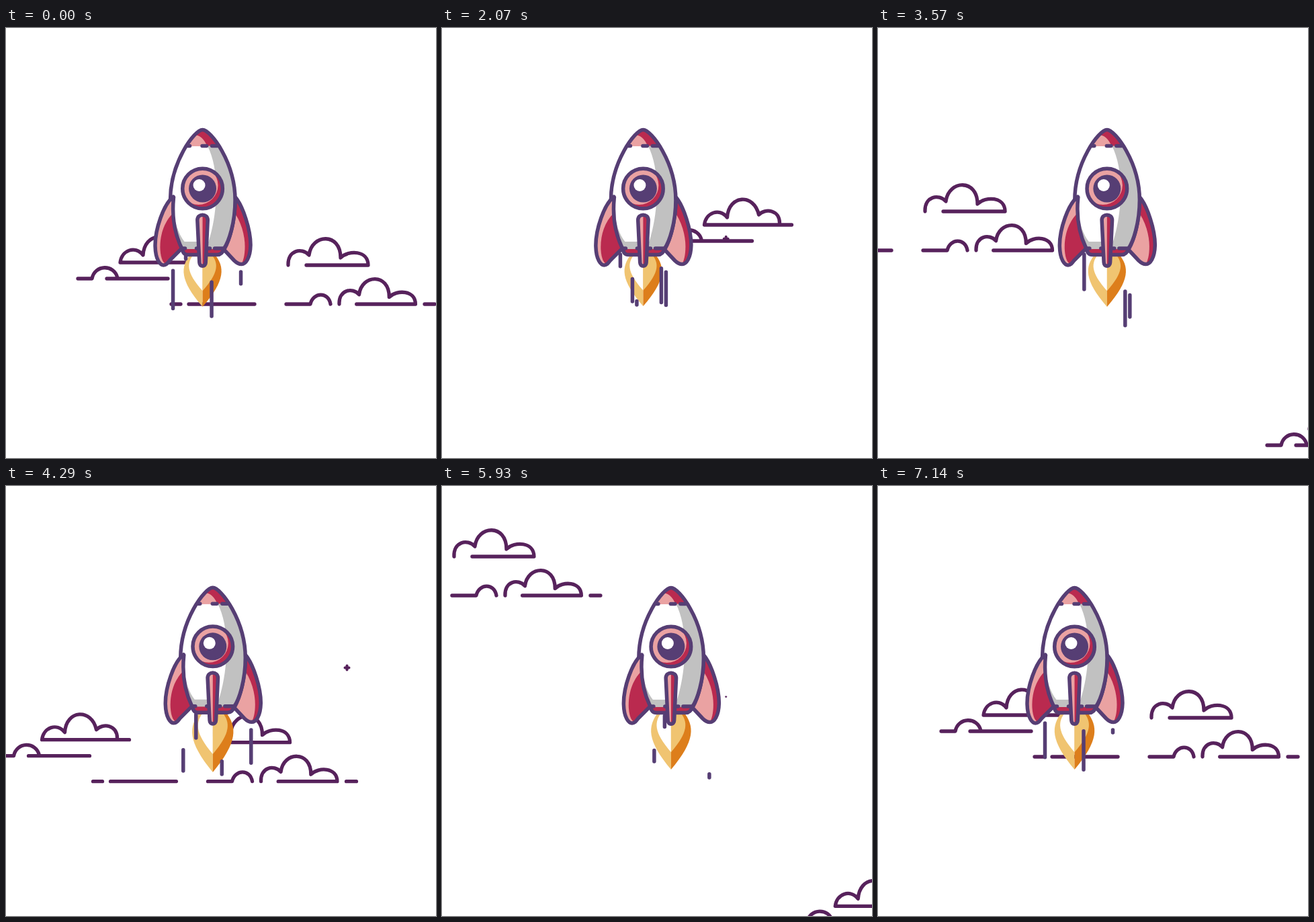
An HTML page that plays this animation: 640 px wide and 640 px high, repeating every 7.21 s.

```html
<!DOCTYPE html>
<html lang="en">
<head>
<meta charset="utf-8">
<title>Rocket</title>
<style>
  html, body { margin: 0; width: 100%; height: 100%; overflow: hidden; background: #fff; }
  svg { display: block; width: 100%; height: 100%; }
  .line { fill: none; stroke: #563e74; stroke-width: 5.5; stroke-linecap: round; stroke-linejoin: round; }
  .cloud { fill: none; stroke: #57225c; stroke-width: 5.3; stroke-linecap: round; stroke-linejoin: round; }
  .star { fill: none; stroke: #57225c; stroke-width: 4; stroke-linecap: round; }
  .pink { fill: #eaa2a2; } .red { fill: #ba2a4f; } .gray { fill: #c1c1c1; }
  .white { fill: #fff; } .dark { fill: #563e74; }
  .yellow { fill: #f0c471; } .orange { fill: #dd7e1b; }
</style>
</head>
<body>
<svg viewBox="0 0 640 640">
  <defs>
    <path id="body" d="M0 151.500C-12 151.500 -48 200 -48 256C-48 290 -38 318 -31 329H32C39 318 48.500 290 48.500 256C48.500 200 12 151.500 0 151.500Z"/>
    <path id="finL" d="M-43.500 251C-58 262 -71 300 -70.500 325C-70 345 -63 353 -58 353C-54 353 -52 350 -49 346L-31 328C-42 305 -46 280 -43 252Z"/>
    <path id="finR" d="M49 252C60 265 71.500 300 71.500 323C71 343 64 351.500 58 351.500C53 351.500 50 349 47 346L32 330C42 312 48 285 49 252Z"/>
    <path id="finC" d="M-7.700 286C-7.700 275.500 7.700 275.500 7.700 286L4.700 349C4.500 356 -4.500 356 -4.700 349Z"/>
    <clipPath id="inBody"><use href="#body"/></clipPath>
    <clipPath id="inFinL"><use href="#finL"/></clipPath>
    <clipPath id="inFinR"><use href="#finR"/></clipPath>
    <clipPath id="inFinC"><use href="#finC"/></clipPath>
    <clipPath id="inPort"><circle cy="239" r="30"/></clipPath>

    <path id="half" d="M0 0H-.62C-1.2 .25 -1.22 .5 0 1Z"/>

    <path id="puffLeft" d="M130 0H0C2 -18 22 -26 34 -11C36 -45 74 -47 81 -15C90 -25 113 -23 112 -1M-63 24H-42C-38 3 -9 2 -4 23M-20 24H71"/>
    <path id="puffRight" d="M0 0C-1 -22 20 -27 31 -15C35 -47 78 -49 78 -11C90 -23 119 -22 119 0H27"/>
    <g id="fullBank">
      <use href="#puffLeft"/>
      <path d="M76 62H90M102 62H200"/>
      <use href="#puffRight" x="250" y="4"/>
      <path d="M247 62H283C287 44 310 43 313 62M453 62H468"/>
      <use href="#puffRight" transform="translate(326 62) scale(.953)" stroke-width="5.6"/>
    </g>
    <g id="lightBank">
      <use href="#puffLeft"/>
      <use href="#puffRight" x="313" y="24"/>
    </g>
  </defs>

  <g id="sky"></g>
  <g id="ship">
    <g id="flame">
      <use href="#half" class="yellow"/>
      <use href="#half" class="orange" transform="scale(-1 1)"/>
      <use href="#half" class="white" transform="scale(.72 .7)"/>
      <use href="#half" class="yellow" transform="scale(-.72 .7)"/>
    </g>
    <g id="trails"></g>
    <g id="rocket">
      <g clip-path="url(#inFinR)">
        <use href="#finR" class="red"/>
        <path class="pink" d="M44 270C58 287 63 310 63 325C63 340 60 349 56 354L28 332Z"/>
      </g>
      <use href="#finR" class="line"/>
      <path class="red" d="M-31 328H32C30 335 27 337.500 22 337.500H-22C-27 337.500 -29 335 -31 328Z"/>
      <path class="line" d="M-31 328C-29 335 -27 337.500 -22 337.500H22C27 337.500 30 335 32 328"/>
      <g clip-path="url(#inBody)">
        <use href="#body" class="gray"/>
        <path class="white" d="M-60 175H7C25 208 24 270 9 318H-27C-35 308 -41 292 -44 270L-60 250Z"/>
        <path class="red" d="M-40 140H40V175.500H-40Z"/>
        <path class="pink" d="M-34 176C-18 156 -4 152 7 176Z"/>
      </g>
      <path class="line" d="M-31 328C-38 318 -48 290 -48 256C-48 200 -12 151.500 0 151.500C12 151.500 48.500 200 48.500 256C48.500 290 39 318 32 328"/>
      <path class="line" d="M-22 175.500H-19M-.5 175.500H6M14 175.500H22M-32 328H-26M-9 328H11M18 328H32"/>
      <g clip-path="url(#inFinL)">
        <use href="#finL" class="pink"/>
        <path class="red" d="M-40 272C-58 287 -64 310 -63 330C-62 345 -58 350 -54 352L-28 330Z"/>
      </g>
      <use href="#finL" class="line"/>
      <g clip-path="url(#inPort)">
        <circle class="red" cy="239" r="30"/>
        <circle class="pink" cx="-6" cy="234" r="29"/>
      </g>
      <circle class="line" cy="239" r="29.800"/>
      <circle class="dark" cy="239" r="20.500"/>
      <circle class="white" cx="-5" cy="234" r="9"/>
      <g clip-path="url(#inFinC)">
        <use href="#finC" class="red"/>
        <path class="pink" d="M-10 270H0V360H-10Z"/>
      </g>
      <use href="#finC" class="line"/>
    </g>
  </g>
</svg>
<script>
const LOOP = 7210, SHOTS = 101, SHOT_RATE = 14, RATE = 25, TICKS = 180;
const $ = id => document.getElementById(id);

function add(parent, tag, attrs) {
  const el = document.createElementNS("http://www.w3.org/2000/svg", tag);
  for (const key in attrs) el.setAttribute(key, attrs[key]);
  return parent.appendChild(el);
}
const move = (el, x, y, more = "") => el.setAttribute("transform", `translate(${x} ${y}) ${more}`);

// position (x, y) at tick `at`, then constant drift per tick
const banks = [
  { shape: "fullBank", at: 0, x: 170, y: 349, dx: 12.97, dy: 8, wraps: true },
  { shape: "lightBank", at: 27, x: 225, y: 93, dx: 6.62, dy: 8 },
  { shape: "fullBank", at: 108, x: 53.5, y: 377.7, dx: 12.97, dy: 6.04 }
].map(b => ({ ...b, el: add($("sky"), "use", { href: "#" + b.shape, class: "cloud" }) }));

const STAR_LIFE = 18;
const stars = [
  { x: 157, y: 327, born: 23, every: 45 },
  { x: 507.5, y: 270.5, born: 10, every: 90 },
  { x: 422.7, y: 313.7, born: 42, every: 90 }
].map(s => ({ ...s, el: add($("sky"), "path", { d: "M-3 0H3M0 -3V3", class: "star" }) }));

// each trail: offset, top, end, tick the head starts, tick the tail starts
const TRAIL_SPEED = 13.7;
const trailCycles = [0, 35.5, 71, 105.7, 140.5, 180];
const trails = [
  [-44, 353, 424, -4.7, -.6], [13.5, 340, 429, -7, -2.8],
  [57, 363, 434, -1.3, 3.7], [-25, 340, 410, -.25, 4.6],
  [-9.5, 342, 412, 7.3, 11.8], [-16, 342, 407, 11, 14.2],
  [-34, 337, 410, 15.2, 20], [27, 340, 445, 11.5, 15.2],
  [34, 340, 430, 11.2, 14.8], [37, 337, 410, 25.7, 30],
  [48, 360, 440, 21.8, 27]
];
const trailPath = add($("trails"), "path", { class: "line" });

const flameTips = [[0, 415], [3, 426], [4, 427], [7, 414], [11, 429], [12, 430], [14, 422], [15, 415]];

function lookup(keys, t) {
  const i = keys.findIndex(k => k[0] > t);
  const [t0, v0] = keys[i - 1], [t1, v1] = keys[i];
  return v0 + (v1 - v0) * (t - t0) / (t1 - t0);
}

function trailsAt(tick) {
  let d = "";
  for (const start of trailCycles) {
    for (const [x, top, end, head, tail] of trails) {
      const reach = from => Math.min(end, top + Math.max(0, tick - start - from) * TRAIL_SPEED);
      const y0 = reach(tail), y1 = reach(head);
      if (y1 > y0) d += `M${x} ${y0}V${y1}`;
    }
  }
  return d;
}

function draw(tick) {
  for (const b of banks) {
    const age = (b.wraps && tick > TICKS / 2 ? tick - TICKS : tick) - b.at;
    move(b.el, b.x + b.dx * age, b.y + b.dy * age);
  }
  for (const s of stars) {
    const age = (tick - s.born + TICKS) % s.every;
    const size = Math.max(0, Math.min(1, age / 3, (STAR_LIFE - age) / 3));
    move(s.el, s.x, s.y, `scale(${size})`);
  }
  const sway = 316.7 - 24.2 * Math.cos((tick + .6) * Math.PI / 30);
  const tip = lookup(flameTips, tick % 15);
  move($("ship"), sway, 0);
  move($("flame"), 0, 336, `scale(${28 + (tip - 415) * .23} ${tip - 336})`);
  move($("rocket"), 0, -Math.max(0, tip - 425) * .18);
  trailPath.setAttribute("d", trailsAt(tick));
}

function frame() {
  const t = performance.now() % LOOP;
  const shot = Math.floor((t + 5) * SHOTS / LOOP) % SHOTS;
  draw(Math.ceil(shot * RATE / SHOT_RATE));
  requestAnimationFrame(frame);
}
frame();
</script>
</body>
</html>
```
